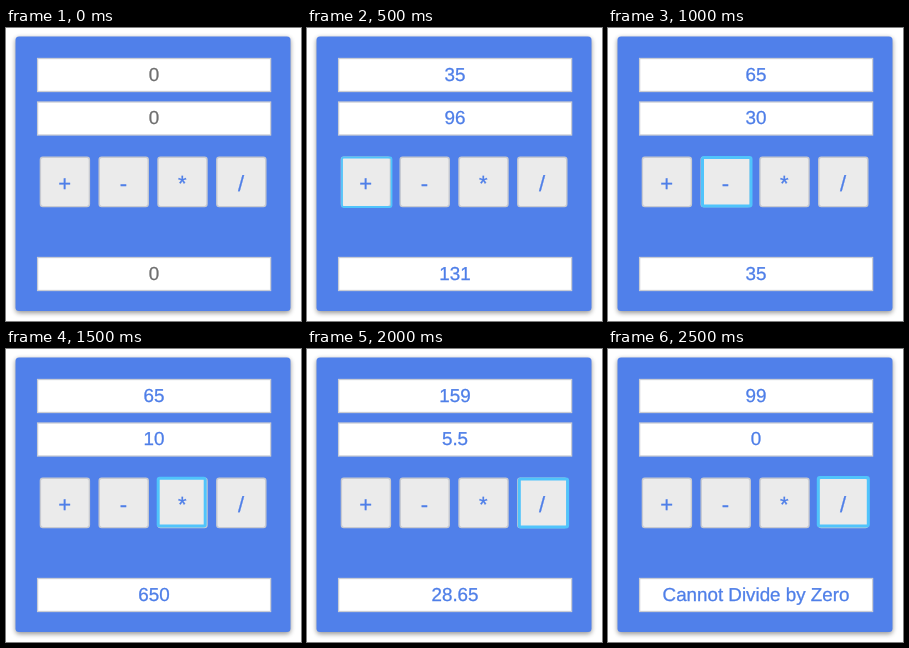
Animation, 295 px wide and 293 px high, one loop 3000 ms. Source, as an HTML page:

```html
<!DOCTYPE html>
<html lang="en">
<head>
<meta charset="utf-8">
<title>Calculator</title>
<style>
  html, body { margin: 0; width: 100%; height: 100%; overflow: hidden; background: #fff; }
  svg { display: block; width: 100%; height: 100%; }
  text {
    font-family: "Liberation Sans", Arial, sans-serif; text-anchor: middle;
    fill: currentColor; stroke: currentColor; stroke-width: .3; color: #4f7fe8;
    text-rendering: geometricPrecision;
  }
  .value { font-size: 18.8px; }
  .sign { font-size: 22px; }
</style>
</head>
<body>
<svg id="stage" viewBox="0 0 295 293">
  <defs>
    <filter id="soft" x="-10%" y="-10%" width="120%" height="120%">
      <feGaussianBlur stdDeviation="2.4"/>
    </filter>
  </defs>
  <rect x="9.5" y="10" width="275" height="275" rx="4" fill="#000" opacity=".42" filter="url(#soft)"/>
  <rect x="9.5" y="8.5" width="275" height="274.5" rx="3.5" fill="#5080ea"/>
</svg>
<script>
const svg = document.getElementById("stage");
const STEP = 500;

// first operand, second operand, result, focus ring [x, y, w, h, weight]
const states = [
  ["0", "0", "0"],
  ["35", "96", "131", [35, 129.5, 49.5, 49.5, 1.8]],
  ["65", "30", "35", [94.5, 129.5, 48.5, 48.5, 3]],
  ["65", "10", "650", [152.2, 129.2, 47, 47.8, 3]],
  ["159", "5.5", "28.65", [212.3, 130, 48.3, 48, 3]],
  ["99", "0", "Cannot Divide by Zero", [210.3, 128.5, 50, 48.5, 3]]
];

function add(tag, attrs, content) {
  const el = document.createElementNS("http://www.w3.org/2000/svg", tag);
  set(el, attrs);
  if (content) el.textContent = content;
  return svg.appendChild(el);
}

function set(el, attrs) {
  for (const key in attrs) el.setAttribute(key, attrs[key]);
}

const fields = [30, 73.5, 229].map(y => {
  add("rect", { x: 31.6, y: y + .5, width: 233, height: 33, fill: "#fff", stroke: "#c9ccd4", "stroke-width": 1.3 });
  return add("text", { class: "value", x: 148, y: y + 22.9 });
});

["+", "-", "*", "/"].forEach((sign, i) => {
  const x = 34.4 + i * 58.8;
  add("rect", { x, y: 129.2, width: 49, height: 49.4, rx: 2.5, fill: "#ebebeb", stroke: "#c8cad0", "stroke-width": 1.4 });
  add("text", { class: "sign", x: x + 24.3, y: 162.8 }, sign);
});

const ring = add("rect", { rx: 1.5, fill: "none", stroke: "#50c4fb" });

function draw(ms) {
  const index = Math.floor(ms / STEP) % states.length;
  const state = states[index];
  fields.forEach((field, i) => {
    field.textContent = state[i];
    field.style.color = index ? "#4f7fe8" : "#707070";
  });
  const box = state[3];
  ring.style.display = box ? "" : "none";
  if (box) {
    const [x, y, width, height, weight] = box;
    set(ring, { x, y, width, height, "stroke-width": weight });
  }
}

const start = performance.now();
function tick() {
  draw(performance.now() - start);
  requestAnimationFrame(tick);
}
tick();
</script>
</body>
</html>
```
